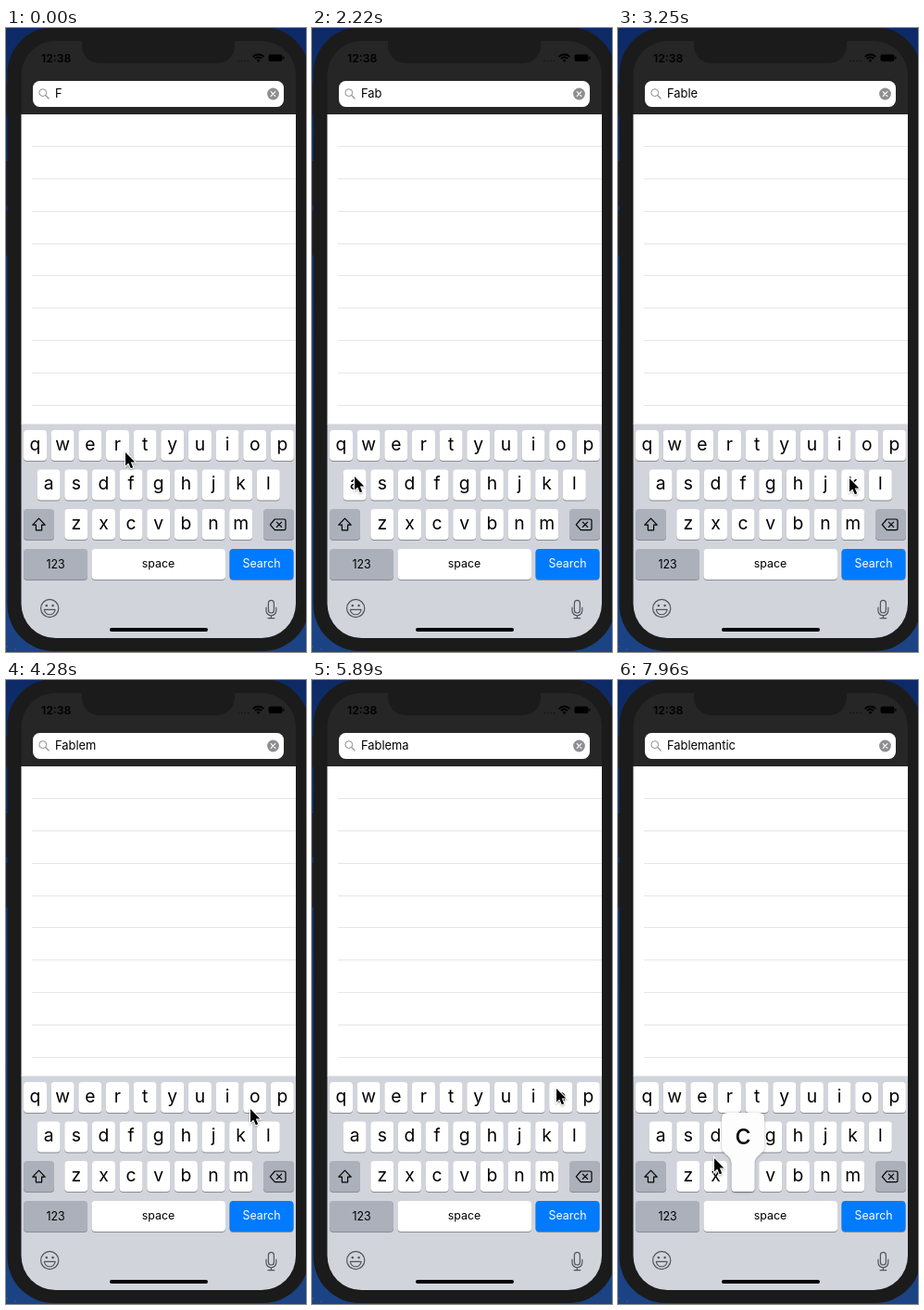
Recreate the animation shown at these times as an HTML page with a canvas. Size 324 by 672 pixels, loop 8000 ms.

```html
<!DOCTYPE html>
<html lang="en">
<head>
<meta charset="utf-8">
<title>Search typing</title>
<style>
  html, body { margin: 0; width: 100%; height: 100%; overflow: hidden; background: #143a85; }
  canvas { display: block; width: 324px; height: 672px; }
</style>
</head>
<body>
<canvas id="stage"></canvas>
<script>
const W = 324, H = 672, LOOP = 8000, TICK = 147.18;
const FONT = 'Inter, Roboto, sans-serif';
const WORD = 'Fablemantic';

const canvas = document.getElementById('stage');
const ratio = window.devicePixelRatio || 1;
canvas.width = W * ratio;
canvas.height = H * ratio;
const ctx = canvas.getContext('2d');

// Ticks at which a letter is added, and the key that pops up with it.
const presses = [
  [1, 'r'], [6, 'e'], [16, 'a'], [21, 'k'], [28, 'o'],
  [36, 'n'], [41, ''], [44, 'm'], [48, 'i'], [54, 'c']
];

// Pointer stops: tick, x, y.
const stops = [
  [0, 129, 457], [2, 129, 457], [5, 88, 456], [8, 88, 456],
  [13, 46, 483], [16, 46, 483], [18, 176, 500], [19, 250, 485],
  [23, 250, 485], [26, 264, 462], [29, 264, 462], [35, 225, 535],
  [37, 225, 535], [40, 264, 440], [41, 264, 440], [43, 252, 535],
  [44, 252, 535], [46, 250, 438], [48, 243, 442], [51, 137, 535],
  [53, 134, 537], [54, 104, 515]
];

const KEY_W = 25, KEY_H = 33, PITCH = 29.65;
const keys = {};
[['qwertyuiop', 19, 433], ['asdfghjkl', 33.6, 475.5], ['zxcvbnm', 63.3, 518]]
  .forEach(([letters, x, y]) =>
    [...letters].forEach((c, i) => { keys[c] = { x: x + i * PITCH, y }; }));

function box(x, y, w, h, r, fill) {
  ctx.beginPath();
  ctx.roundRect(x, y, w, h, r);
  ctx.fillStyle = fill;
  ctx.fill();
}

function circle(x, y, r, fill) {
  ctx.beginPath();
  ctx.arc(x, y, r, 0, Math.PI * 2);
  ctx.fillStyle = fill;
  ctx.fill();
}

function text(str, x, y, size, color = '#000', align = 'center', weight = 400) {
  ctx.font = `${weight} ${size}px ${FONT}`;
  ctx.textAlign = align;
  ctx.fillStyle = color;
  ctx.fillText(str, x, y);
}

function line(path, color, width) {
  ctx.strokeStyle = color;
  ctx.lineWidth = width;
  ctx.lineCap = ctx.lineJoin = 'round';
  ctx.stroke(new Path2D(path));
}

function key(x, y, w, fill = '#fff') {
  box(x, y + 1, w, KEY_H, 4, '#898c92');
  box(x, y, w, KEY_H, 4, fill);
}

function drawBackdrop() {
  const sky = ctx.createLinearGradient(0, 0, 0, H);
  sky.addColorStop(0, '#0d2a66');
  sky.addColorStop(0.5, '#12408f');
  sky.addColorStop(1, '#1c4384');
  ctx.fillStyle = sky;
  ctx.fillRect(0, 0, W, H);
  for (let i = 0; i < 24; i++) {
    circle((i * 37) % 19, (i * 149) % H, 0.5, '#5f83bd');
  }
  ctx.fillStyle = '#20232f';
  ctx.fillRect(0, 60, 2, 34);
  ctx.fillRect(0, 143, 2, 48);
  ctx.fillRect(0, 197, 2, 48);
}

function drawStatus() {
  box(82, 0, 165, 38, [0, 0, 19, 19], '#1b1b1b');
  text('12:38', 38, 36.5, 12.3, '#000', 'left', 600);
  for (let i = 0; i < 4; i++) circle(251 + i * 3.6, 35.5, 0.8, '#111');
  [[8, 7.4], [5, 4.6]].forEach(([r]) => {
    ctx.beginPath();
    ctx.arc(272.5, 36.5, r, -Math.PI * 0.76, -Math.PI * 0.24);
    ctx.strokeStyle = '#000';
    ctx.lineWidth = 1.8;
    ctx.lineCap = 'butt';
    ctx.stroke();
  });
  ctx.beginPath();
  ctx.moveTo(272.5, 37);
  ctx.arc(272.5, 36.5, 2.6, -Math.PI * 0.76, -Math.PI * 0.24);
  ctx.fillStyle = '#000';
  ctx.fill();
  box(283.5, 28.5, 15, 7.5, 2, '#000');
  box(299.3, 30.7, 1.2, 3, 0.6, '#000');
}

function drawSearch(str) {
  box(29, 57, 271, 28, 7.5, '#fff');
  ctx.beginPath();
  ctx.arc(39.8, 69.6, 3.9, 0, Math.PI * 2);
  ctx.strokeStyle = '#8e8e93';
  ctx.lineWidth = 1;
  ctx.stroke();
  line('M42.7 72.5L46.2 76', '#8e8e93', 1.1);
  text(str, 53, 75.2, 12.9, '#000', 'left');
  circle(288.5, 71, 6.4, '#8e8e93');
  line('M286.2 68.7L290.8 73.3M290.8 68.7L286.2 73.3', '#fff', 1.2);
}

function drawList() {
  ctx.fillStyle = '#fff';
  ctx.fillRect(16, 93, 297, 334);
  ctx.fillStyle = '#e6e6e8';
  for (let i = 0; i < 9; i++) ctx.fillRect(28, Math.round(127 + i * 34.85), 285, 1);
}

function drawKeyboard() {
  ctx.fillStyle = '#d1d4db';
  ctx.fillRect(16, 426.5, 297, 232);
  for (const c in keys) {
    const k = keys[c];
    key(k.x, k.y, KEY_W);
    text(c, k.x + KEY_W / 2, k.y + 21.8, 19.3);
  }
  const grey = '#abb0ba';
  key(19, 518, 33, grey);
  key(278, 518, 33, grey);
  key(19, 561, 69, grey);
  key(92.5, 561, 144.5, '#fff');
  key(241.5, 561, 69, '#007aff');
  text('123', 53.5, 582, 12.4);
  text('space', 164.5, 581.3, 12.4);
  text('Search', 276, 581.3, 12.4, '#fff');

  line('M35.5 528.2L28.8 535.2H32.4V540.8H38.6V535.2H42.2Z', '#000', 1.2);
  line('M290.3 529H300.4Q302 529 302 530.6V539Q302 540.6 300.4 540.6H290.3L285.3 534.8Z', '#000', 1.2);
  line('M292.4 532.2L297.6 537.4M297.6 532.2L292.4 537.4', '#000', 1.2);

  const ink = '#50555c';
  ctx.beginPath();
  ctx.arc(47.2, 625, 9.6, 0, Math.PI * 2);
  ctx.strokeStyle = ink;
  ctx.lineWidth = 1.2;
  ctx.stroke();
  circle(43.8, 622, 1.3, ink);
  circle(50.6, 622, 1.3, ink);
  line('M41.2 626.4H53.2Q52 631.8 47.2 631.8T41.2 626.4Z', ink, 1.1);
  line('M283.4 619.4a3 3 0 0 1 6 0V627a3 3 0 0 1 -6 0Z', ink, 1.2);
  line('M281 624V627.4a5.4 5.4 0 0 0 10.8 0V624M286.4 633V635.6M283 635.6H289.8', ink, 1.2);
  box(112, 646, 106, 4, 2, '#000');
}

function drawPopup(c) {
  const { x, y } = keys[c];
  const bubble = new Path2D(
    'M-4.5 -52H29.5Q35.5 -52 35.5 -46V-15C35.5 -7 25 -7 25 3V29Q25 33 21 33' +
    'H4Q0 33 0 29V3C0 -7 -10.5 -7 -10.5 -15V-46Q-10.5 -52 -4.5 -52Z');
  ctx.save();
  ctx.translate(x, y);
  ctx.shadowColor = 'rgba(0,0,0,0.35)';
  ctx.shadowBlur = 2.5 * ratio;
  ctx.shadowOffsetY = 0.6 * ratio;
  ctx.fillStyle = '#fdfdfe';
  ctx.fill(bubble);
  ctx.restore();
  text(c, x + KEY_W / 2, y - 17.8, 31);
}

function pointerAt(tick) {
  let i = 0;
  while (i < stops.length - 2 && stops[i + 1][0] <= tick) i++;
  const [t0, x0, y0] = stops[i], [t1, x1, y1] = stops[i + 1];
  const p = Math.min(1, (tick - t0) / (t1 - t0));
  const e = p * p * (3 - 2 * p);
  return [x0 + (x1 - x0) * e, y0 + (y1 - y0) * e];
}

function drawPointer(x, y) {
  const arrow = new Path2D('M0 0V14.6L3.3 11.5L5.8 17.2L8.2 16.2L5.8 10.6H10.3Z');
  ctx.save();
  ctx.translate(x, y);
  ctx.shadowColor = 'rgba(0,0,0,0.3)';
  ctx.shadowBlur = 2 * ratio;
  ctx.shadowOffsetY = ratio;
  ctx.strokeStyle = '#fff';
  ctx.lineWidth = 2;
  ctx.lineJoin = 'miter';
  ctx.stroke(arrow);
  ctx.shadowColor = 'transparent';
  ctx.fillStyle = '#000';
  ctx.fill(arrow);
  ctx.restore();
}

function draw(ms) {
  const tick = Math.max(0, Math.floor((ms - 2.6) / TICK));
  const typed = 1 + presses.filter(p => p[0] <= tick).length;
  const press = presses.find(p => p[0] === tick);

  ctx.setTransform(ratio, 0, 0, ratio, 0, 0);
  drawBackdrop();
  box(1.5, -1, 326, 672, 50, '#1b1b1b');
  ctx.save();
  ctx.beginPath();
  ctx.roundRect(16.5, 14, 296.5, 643, 37);
  ctx.clip();
  ctx.fillStyle = '#262626';
  ctx.fillRect(16, 14, 298, 80);
  drawStatus();
  drawSearch(WORD.slice(0, typed));
  drawList();
  drawKeyboard();
  if (press && press[1]) drawPopup(press[1]);
  ctx.restore();
  drawPointer(...pointerAt(tick));
}

const start = performance.now();
function loop() {
  draw((performance.now() - start) % LOOP);
  requestAnimationFrame(loop);
}
draw(0);
requestAnimationFrame(loop);
</script>
</body>
</html>
```
